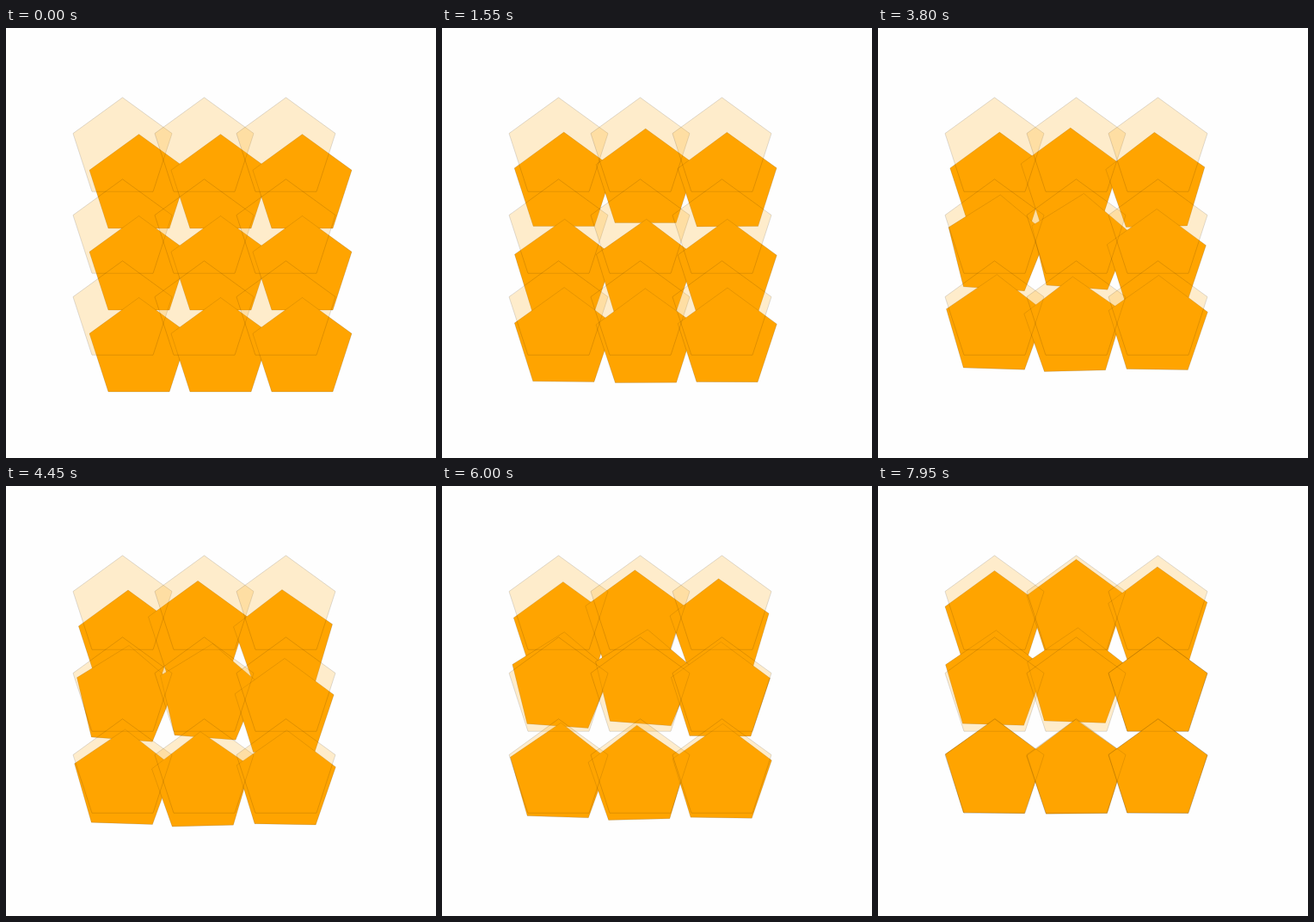
Recreate the animation shown at these times as an HTML page. Size 500 by 500 pixels, loop 8 s.

```html
<!DOCTYPE html>
<html lang="en">
<head>
<meta charset="utf-8">
<title>Pentagons</title>
<style>
  html, body { margin: 0; width: 100%; height: 100%; overflow: hidden; background: #fefefe; }
  svg { display: block; width: 100vw; height: 100vh; }
  polygon { fill: #ffa400; stroke: #000; stroke-width: .5; stroke-opacity: .25; }
  #homes polygon { fill-opacity: .2; }
</style>
</head>
<body>
<svg viewBox="0 0 500 500">
  <g id="pieces"></g>
  <g id="homes"></g>
</svg>
<script>
const LOOP = 8000, STEP = 50, RADIUS = 60.5, GAP = 95;
const START = { x: 19, y: 42.7 };

const corners = Array.from({ length: 5 }, (_, i) => {
  const a = i * Math.PI * 2 / 5;
  return [RADIUS * Math.sin(a), -RADIUS * Math.cos(a)].map(v => v.toFixed(2));
}).join(' ');

function pentagon(layer, x, y) {
  const shape = document.createElementNS('http://www.w3.org/2000/svg', 'polygon');
  shape.setAttribute('points', corners);
  shape.setAttribute('transform', `translate(${x} ${y})`);
  document.getElementById(layer).append(shape);
  return shape;
}

const progress = (t, from, to) => Math.min(1, Math.max(0, (t - from) / (to - from)));
const swing = (t, from, to) => Math.sin(Math.PI * progress(t, from, to));
const easeOut = k => 1 - (1 - k) ** 1.4;
const mix = (a, b, k) => a + (b - a) * k;

const pieces = [];

// A piece waits at height `hold`, then rises to `end` between `leave` and `arrive`.
// On the way it is pushed aside by `sway` pixels and tilted by `lean` degrees.
function piece(col, row, { hold = START.y, leave = 0, arrive, end = 0, sway = 0, lean = 0 }) {
  const x = 135.5 + GAP * col, y = 141.3 + GAP * row;
  pentagon('homes', x, y);
  const shape = pentagon('pieces', x, y);

  pieces.push(t => {
    const dx = mix(START.x, 0, progress(t, 0, 2300)) + sway * swing(t, 1550, 7950);
    const waiting = mix(START.y, hold, progress(t, 0, 850));
    const dy = mix(waiting, end, easeOut(progress(t, leave, arrive)));
    const turn = lean * swing(t, 1000, 9000);
    shape.setAttribute('transform', `translate(${x + dx} ${y + dy}) rotate(${turn})`);
  });
}

piece(0, 0, { hold: 40.3, leave: 4700, arrive: 12000, sway: 6.5 });
piece(1, 0, { hold: 36.2, leave: 3700, arrive: 9200, sway: -7.5 });
piece(2, 0, { hold: 40.5, leave: 4350, arrive: 10900, sway: -3, lean: -1.5 });

piece(0, 1, { hold: 46.5, leave: 2000, arrive: 6400, end: -8, sway: 3, lean: 4.4 });
piece(1, 1, { hold: 46.5, leave: 2000, arrive: 6400, end: -11, sway: 5, lean: 4.7 });
piece(2, 1, { hold: 46.5, leave: 3100, arrive: 6800, sway: -2, lean: .5 });

piece(0, 2, { arrive: 7500, sway: 1, lean: 2 });
piece(1, 2, { arrive: 8400, sway: -3, lean: -1.5 });
piece(2, 2, { arrive: 7800, lean: 1 });

const began = performance.now();

function draw(now) {
  const elapsed = Math.max(0, now - began) % LOOP;
  const time = Math.floor(elapsed / STEP) * STEP;
  pieces.forEach(move => move(time));
  requestAnimationFrame(draw);
}
draw(began);
</script>
</body>
</html>
```
